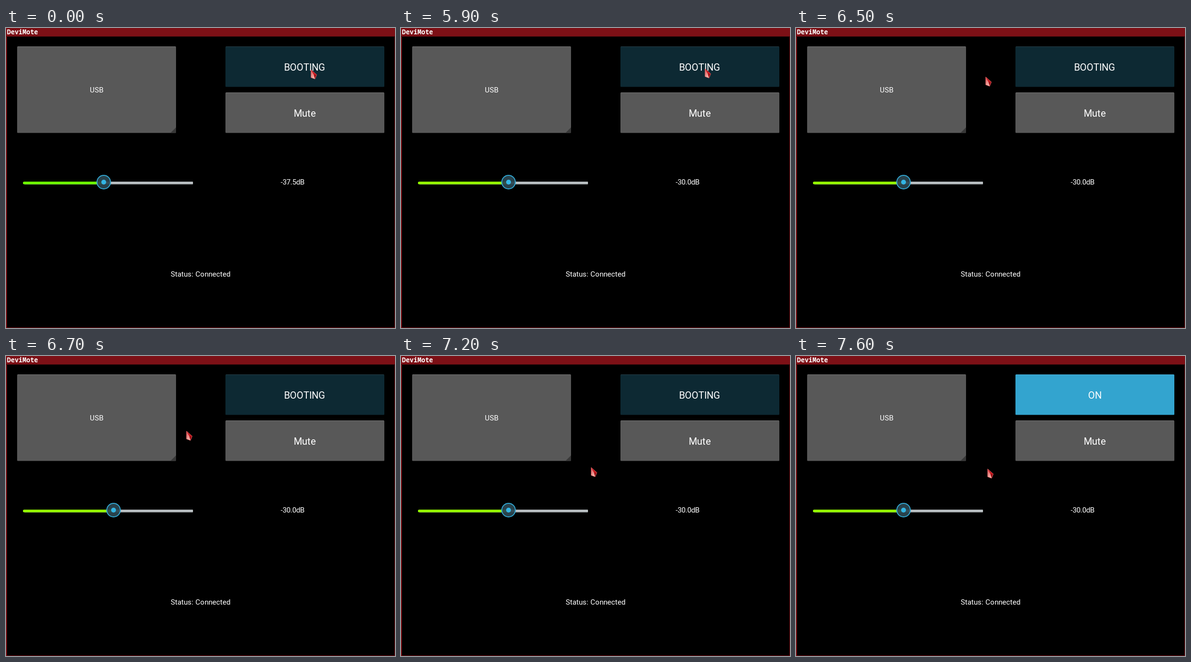
Write an HTML page that moves like this. It is 803 px wide and 619 px high and loops after 8000 ms.

```html
<!DOCTYPE html>
<html lang="en">
<head>
<meta charset="utf-8">
<title>DeviMote</title>
<style>
  html, body { margin: 0; width: 100%; height: 100%; overflow: hidden; background: #000; }
  svg { display: block; width: 803px; height: 619px; }
  text { fill: #fff; font: 15px Roboto, sans-serif; }
  .big { font-size: 20px; }
  .title { font: bold 13.33px "Noto Sans Mono", "DejaVu Sans Mono", monospace; }
  .button { fill: #585858; }
  .shine { fill: #777; }
</style>
</head>
<body>
<svg viewBox="0 0 803 619">
  <rect width="803" height="619" fill="#7d1016"/>
  <rect y="17" width="803" height="1" fill="#450a0d"/>
  <rect x="2" y="18" width="800" height="600"/>
  <text class="title" data-center="34" y="13">DeviMote</text>

  <rect class="button" x="23" y="38" width="328" height="178.5" rx="1.5"/>
  <rect class="shine" x="24" y="38" width="326" height="1"/>
  <path d="M351 205V215L350 216.5H339.5Z" fill="#383838"/>
  <text data-center="187" y="133">USB</text>

  <rect id="power" x="453" y="38" width="328" height="83.5" rx="1.5"/>
  <rect x="454" y="38" width="326" height="1" fill="#fff" opacity=".1"/>
  <text id="powerLabel" class="big" data-center="617" y="88"></text>

  <rect class="button" x="453" y="133" width="328" height="83.5" rx="1.5"/>
  <rect class="shine" x="454" y="133" width="326" height="1"/>
  <text class="big" data-center="617" y="183">Mute</text>

  <rect x="38" y="317" width="348" height="5.5" rx="1" fill="#b8bec1"/>
  <rect id="level" x="35" y="317" height="5.5" rx="2.5"/>
  <g id="knob">
    <circle r="14" fill="#2b4550" fill-opacity=".94" stroke="#31a5d0" stroke-width="2"/>
    <circle r="5" fill="#33b5e5"/>
  </g>
  <text id="volume" data-center="591.5" y="323"></text>
  <text data-center="401.5" y="513">Status: Connected</text>

  <defs>
    <linearGradient id="facet" x1="0" y1="0" x2=".5" y2="1">
      <stop offset="0" stop-color="#d8454a"/>
      <stop offset="1" stop-color="#f6b9b0"/>
    </linearGradient>
  </defs>
  <g id="cursor" stroke-linejoin="round">
    <path d="M.7 1L12.4 11.5L8.8 20.2L.7 17.2Z" fill="#c8171e"/>
    <path d="M.7 1L6.5 12L8.8 20.2L.7 17.2Z" fill="url(#facet)"/>
    <path d="M6.5 12L12.4 11.5L8.8 20.2Z" fill="#9c1016"/>
    <path d="M.7 1L12.4 11.5L8.8 20.2L.7 17.2Z" fill="none" stroke="#e67674" stroke-width=".7"/>
  </g>
</svg>
<script>
  const LOOP = 8000, STEP = 100;
  const el = id => document.getElementById(id);
  const pen = document.createElement("canvas").getContext("2d");

  // Centres a label with every glyph on a whole pixel
  function setText(node, str) {
    node.textContent = str;
    const style = getComputedStyle(node);
    pen.font = `${style.fontWeight} ${style.fontSize} ${style.fontFamily}`;
    const widths = [...str].map(c => Math.round(pen.measureText(c).width));
    const total = widths.reduce((a, b) => a + b, 0);
    let x = Math.floor(node.dataset.center - total / 2);
    node.setAttribute("x", widths.map(w => (x += w) - w).join(" "));
  }

  // Turning points of the pointer: time, x, y
  const turns = [
    [5800, 629, 85], [5900, 627, 83], [6500, 391, 100], [6700, 372, 154],
    [7000, 391, 228], [7100, 391, 228], [7400, 395, 232]
  ];
  const smooth = p => p * p * (3 - 2 * p);
  const clamp = p => Math.min(1, Math.max(0, p));

  function pointer(t) {
    const now = Math.floor(t / STEP) * STEP;
    const next = turns.findIndex(k => k[0] > now);
    const i = next < 0 ? turns.length - 1 : Math.max(1, next);
    const [t0, x0, y0] = turns[i - 1], [t1, x1, y1] = turns[i];
    const p = smooth(clamp((now - t0) / (t1 - t0)));
    return [x0 + (x1 - x0) * p, y0 + (y1 - y0) * p].map(Math.round);
  }

  function draw(t) {
    el("cursor").setAttribute("transform", `translate(${pointer(t)})`);

    const db = t < 500 ? -37.5 : -30;
    const pos = 222 + (db + 30) * 2.7;
    el("knob").setAttribute("transform", `translate(${pos} 318)`);
    el("level").setAttribute("width", pos - 35);
    el("level").setAttribute("fill", `rgb(${Math.round(148 + (db + 30) * 5.33)} 255 0)`);
    setText(el("volume"), db.toFixed(1) + "dB");

    const on = t >= 7600;
    el("power").setAttribute("fill", on ? "#33a4cf" : "#0d2933");
    setText(el("powerLabel"), on ? "ON" : "BOOTING");
  }

  document.querySelectorAll("text").forEach(n => setText(n, n.textContent));
  const start = performance.now();
  function tick() {
    draw((performance.now() - start) % LOOP);
    requestAnimationFrame(tick);
  }
  tick();
</script>
</body>
</html>
```
